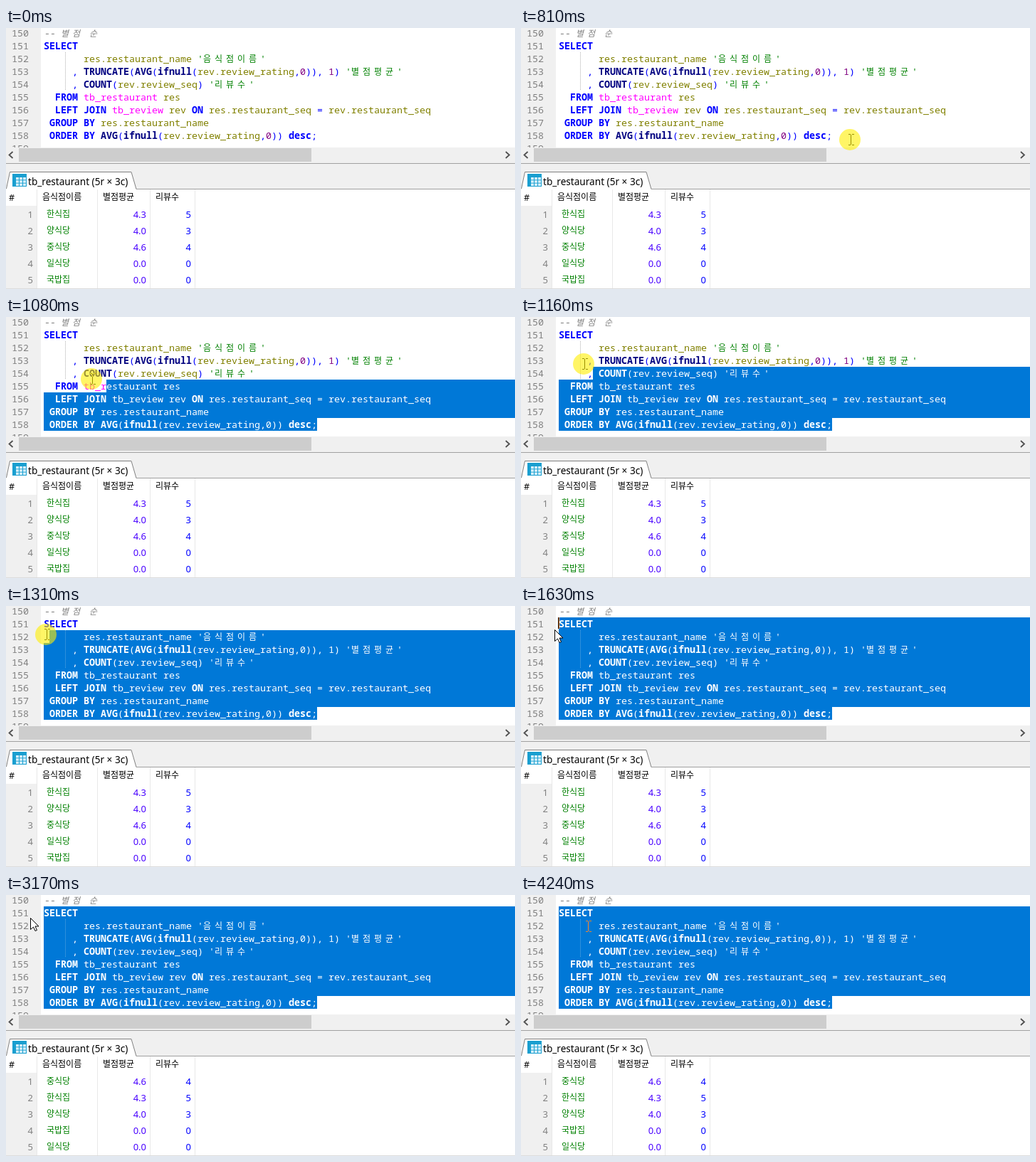
An HTML page with a canvas for the animation above (4.49 s loop, 715 px wide and 367 px high).

```html
<!DOCTYPE html>
<html lang="ko">
<head>
<meta charset="utf-8">
<title>SQL editor</title>
<style>
  html, body { margin: 0; height: 100%; overflow: hidden; background: #fff; }
  canvas { display: block; }
</style>
</head>
<body>
<canvas id="stage" width="715" height="367"></canvas>
<script>
const LOOP = 4490, WIDTH = 715, HEIGHT = 367;
const LEFT = 53, TOP = 16, CHAR = 8, ROW = 18, LAST_ROW = 7, SELECTION_END = 437;
const MONO = '13.333px "Noto Sans Mono", monospace';
const HANGUL = '12px "Noto Sans CJK KR", "Noto Sans CJK", sans-serif';
const SANS = '"Noto Sans", "Noto Sans CJK KR", sans-serif';
const ctx = document.getElementById('stage').getContext('2d');

const query = [
  '-- 별점 순',
  'SELECT',
  "       res.restaurant_name '음식점이름'",
  "     , TRUNCATE(AVG(ifnull(rev.review_rating,0)), 1) '별점평균'",
  "     , COUNT(rev.review_seq) '리뷰수'",
  '  FROM tb_restaurant res',
  '  LEFT JOIN tb_review rev ON res.restaurant_seq = rev.restaurant_seq',
  ' GROUP BY res.restaurant_name',
  ' ORDER BY AVG(ifnull(rev.review_rating,0)) desc;',
  ''
];
const before = [['한식집', '4.3', 5], ['양식당', '4.0', 3], ['중식당', '4.6', 4],
                ['일식당', '0.0', 0], ['국밥집', '0.0', 0]];
const after = [2, 0, 1, 4, 3].map(i => before[i]);

// Pointer path: time, x, y
const path = [
  [80, 645, 352], [180, 608, 305], [300, 545, 235], [420, 482, 175],
  [500, 457, 158], [580, 464, 157], [810, 464, 157], [860, 440, 155],
  [910, 375, 148], [960, 268, 134], [990, 203, 116], [1060, 130, 92],
  [1160, 90, 66], [1240, 70, 50], [1310, 58, 40], [1340, 50, 36],
  [1400, 47, 33], [1630, 47, 33], [1790, 34, 32], [3630, 34, 32],
  [3700, 98, 43], [3740, 94.5, 44]
];

function pointerAt(t) {
  const i = path.findIndex(p => p[0] > t);
  if (i < 0) return path[path.length - 1].slice(1);
  if (i === 0) return path[0].slice(1);
  const [a, b] = [path[i - 1], path[i]];
  const k = (t - a[0]) / (b[0] - a[0]);
  return [a[1] + (b[1] - a[1]) * k, a[2] + (b[2] - a[2]) * k];
}

function rect(color, x, y, w, h) {
  ctx.fillStyle = color;
  ctx.fillRect(x, y, w, h);
}

function line(color, width, ...points) {
  ctx.beginPath();
  points.forEach(([x, y]) => ctx.lineTo(x, y));
  ctx.strokeStyle = color;
  ctx.lineWidth = width;
  ctx.stroke();
}

function text(value, x, y, color, font, align = 'left') {
  ctx.font = font;
  ctx.fillStyle = color;
  ctx.textAlign = align;
  ctx.fillText(value, x, y);
}

function tokenStyle(token) {
  if (/^--/.test(token)) return ['#808080', 'italic '];
  if (/^'/.test(token)) return ['#008000', ''];
  if (/^(SELECT|FROM|LEFT|JOIN|ON|GROUP|BY|ORDER|desc)$/.test(token)) return ['#0000ff', 'bold '];
  if (/^(TRUNCATE|AVG|ifnull|COUNT)$/.test(token)) return ['#000080', 'bold '];
  if (/^tb_/.test(token)) return ['#ff00ff', ''];
  if (/^\d/.test(token)) return ['#800080', ''];
  return [/^[a-z]/.test(token) ? '#808000' : '#0000ff', ''];
}

// Each character sits on the editor grid; Hangul takes two cells.
function drawQuery(override) {
  query.forEach((source, i) => {
    let x = LEFT;
    for (const token of source.match(/--.*|'[^']*'|[A-Za-z_.]+|\d+|\s+|./g) || []) {
      const [color, style] = tokenStyle(token);
      for (const char of token) {
        const wide = char >= '가';
        if (char !== ' ') text(char, x, TOP + ROW * (i - 1) + 14, override || color, style + (wide ? HANGUL : MONO));
        x += wide ? CHAR * 2 : CHAR;
      }
    }
  });
  ctx.setLineDash([1, 1]);
  line(override ? '#5aa5e0' : '#b0b0b0', 1, [83.5, 34], [83.5, 88]);
  ctx.setLineDash([]);
}

function drawSelection(t) {
  if (t < 840) return;
  const [x, y] = pointerAt(Math.min(t, 1630) - 30);
  const row = Math.max(0, Math.min(LAST_ROW, Math.floor((y - TOP) / ROW)));
  const start = LEFT + CHAR * Math.max(0, Math.round((x - LEFT) / CHAR));
  ctx.save();
  ctx.beginPath();
  for (let r = row; r <= LAST_ROW; r++) {
    const from = r === row ? Math.min(start, r === LAST_ROW ? SELECTION_END : WIDTH) : LEFT;
    const to = r === LAST_ROW ? SELECTION_END : WIDTH;
    ctx.rect(from, TOP + r * ROW, to - from, ROW);
  }
  ctx.clip();
  rect('#0078d7', 0, 0, WIDTH, 168);
  drawQuery('#fff');
  ctx.restore();
}

function invert(...boxes) {
  ctx.globalCompositeOperation = 'difference';
  boxes.forEach(box => rect('#fff', ...box));
  ctx.globalCompositeOperation = 'source-over';
}

function drawEditor(t) {
  ctx.save();
  ctx.beginPath();
  ctx.rect(0, 0, WIDTH, 168);
  ctx.clip();
  rect('#f0f0f0', 0, 0, 49, 168);
  query.forEach((_, i) => text(150 + i, 8, TOP + ROW * (i - 1) + 14, '#808080', MONO));
  drawQuery();
  drawSelection(t);
  const caretOn = (t >= 1430 && t < 1960) || (t >= 2490 && t < 3170) || (t >= 3700 && t < 4240);
  if (caretOn) invert([52, 16, 2, 16]);
  ctx.restore();
}

function drawScrollbar() {
  rect('#f0f0f0', 0, 168, WIDTH, 59);
  rect('#cdcdcd', 18, 169, 411, 19);
  line('#505050', 1.8, [9.5, 174], [4.5, 178.5], [9.5, 183]);
  line('#505050', 1.8, [702, 174], [707, 178.5], [702, 183]);
  rect('#a0a0a0', 0, 190, WIDTH, 1);
}

function drawTab() {
  rect('#a0a0a0', 0, 226, WIDTH, 1);
  ctx.beginPath();
  [[0, 227], [5.5, 202.5], [176, 202.5], [183, 227]].forEach(p => ctx.lineTo(...p));
  ctx.fillStyle = '#fff';
  ctx.fill();
  line('#808080', 1, [0.5, 226], [5.5, 202.5], [176, 202.5], [183, 226.5]);
  rect('#1a9fd0', 9, 205, 20, 18);
  for (let r = 0; r < 3; r++)
    for (let c = 0; c < 3; c++) rect('#d5effa', 14 + c * 5, 210 + r * 4.3, 4, 3.4);
  text('tb_restaurant (5r × 3c)', 31, 221, '#000', '13.6px ' + SANS);
}

function drawTable(rows) {
  rect('#fff', 0, 227, WIDTH, 140);
  rect('#f0f0f0', 0, 250, 43, 116);
  [43, 128, 202, 265].forEach(x => rect('#e8e8e8', x, 227, 1, 139));
  rect('#dcdcdc', 0, 366, WIDTH, 1);
  text('#', 4, 243, '#000', '12.5px ' + SANS);
  [['음식점이름', 51], ['별점평균', 136], ['리뷰수', 210]]
    .forEach(([label, x]) => text(label, x, 242, '#000', HANGUL));
  rows.forEach(([name, rating, reviews], i) => {
    const y = 267 + i * 23, font = '13px ' + SANS;
    text(i + 1, 38, y, '#808080', font, 'right');
    text(name, 57, y - 1, '#008000', HANGUL);
    text(rating, 197, y, '#4800ff', font, 'right');
    text(reviews, 260, y, '#0000ff', font, 'right');
  });
}

function drawPointer(t) {
  if (t < 80) return;
  const [x, y] = pointerAt(t).map(Math.round);
  if (x >= LEFT && y < 168) {
    invert([x - 4, y - 8, 3, 1], [x + 1, y - 8, 3, 1], [x - 1, y - 7, 1, 14],
           [x - 4, y + 7, 3, 1], [x + 1, y + 7, 3, 1]);
  } else {
    ctx.beginPath();
    [[0, 0], [0, 16], [4, 12.5], [6.5, 18], [9, 17], [6.5, 11.5], [11.5, 11.5]]
      .forEach(([dx, dy]) => ctx.lineTo(x + dx + 0.5, y + dy + 0.5));
    ctx.closePath();
    ctx.fillStyle = '#fff';
    ctx.fill();
    ctx.strokeStyle = '#000';
    ctx.lineWidth = 1;
    ctx.stroke();
  }
  if (t >= 810 && t < 1630) {
    ctx.beginPath();
    ctx.arc(x - (x >= LEFT ? 2 : 0), y, 15, 0, Math.PI * 2);
    ctx.fillStyle = 'rgba(255, 238, 0, 0.6)';
    ctx.fill();
  }
}

const startTime = performance.now();
function frame() {
  const t = (performance.now() - startTime) % LOOP;
  rect('#fff', 0, 0, WIDTH, HEIGHT);
  drawEditor(t);
  drawScrollbar();
  drawTab();
  drawTable(t < 2570 ? before : after);
  drawPointer(t);
  requestAnimationFrame(frame);
}
frame();
</script>
</body>
</html>
```
